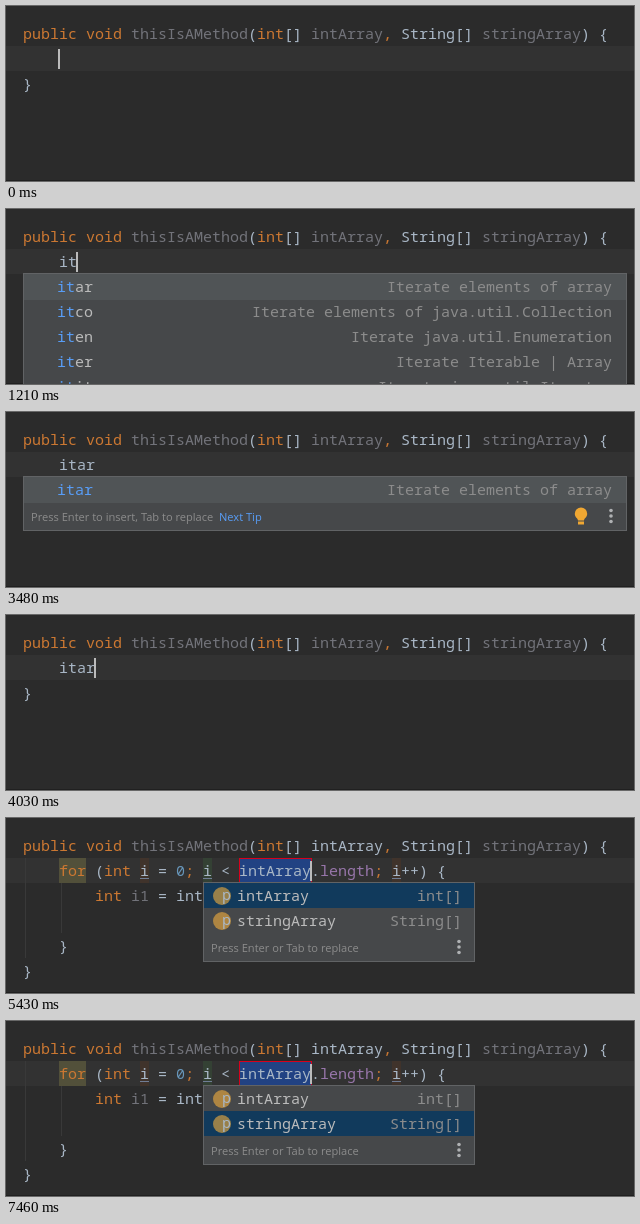
Animation of 628x175 px, one loop 8 s. Source, as an HTML page:

```html
<!DOCTYPE html>
<html lang="en">
<head>
<meta charset="utf-8">
<title>Live template completion</title>
<style>
  html, body { margin: 0; width: 628px; height: 175px; overflow: hidden; background: #2b2b2b; }
  svg { display: block; }
  text { font: 15px "Noto Sans Mono", "DejaVu Sans Mono", monospace; fill: #a9b7c6; white-space: pre; }
  .kw { fill: #cc7832; }
  .unused { fill: #72737a; }
  .num { fill: #6897bb; }
  .field { fill: #9876aa; }
  .item text { fill: #bbbbbb; }
  .item .hit { fill: #589df6; }
  .item .type { fill: #8c8c8c; text-anchor: end; }
  .bold { font-weight: 700; }
  .list { fill: #46484a; stroke: #616365; }
  .soft { fill: #505456; }
  .strong { fill: #113a5c; }
  .hint { font: 11.1px "Open Sans", "Noto Sans", sans-serif; fill: #8c8c8c; }
  .link { fill: #589df6; }
  .select { fill: #214283; }
  .stop { fill: none; stroke: #d8001c; }
  .under { stroke: #707d95; }
  .guide { stroke: #393939; }
  .item .badge { font-size: 13px; fill: #231f20; fill-opacity: .8; text-anchor: middle; }
</style>
</head>
<body>
<svg width="628" height="175" viewBox="0 0 628 175">
  <defs>
    <g id="param">
      <circle r="9" fill="#f4af3d" fill-opacity=".6"/>
      <text class="badge" y="4">p</text>
    </g>
    <g id="method">
      <circle r="9" fill="#f98b9e" fill-opacity=".6"/>
      <text class="badge" y="4">m</text>
    </g>
    <g id="dots" fill="#afb1b3">
      <circle cy="-5.5" r="1.8"/><circle r="1.8"/><circle cy="5.5" r="1.8"/>
    </g>
  </defs>

  <rect width="628" height="175" fill="#2b2b2b"/>
  <rect y="40" width="628" height="25" fill="#323232"/>
  <rect y="174" width="628" height="1" fill="#202020"/>

  <!-- method header -->
  <text x="17" y="33"><tspan class="kw">public void </tspan><tspan class="unused">thisIsAMethod</tspan>(<tspan class="kw">int</tspan>[]</text>
  <text x="305" y="33" class="unused" data-on="0-4420">intArray</text>
  <text x="305" y="33" data-on="4420-8000">intArray</text>
  <text x="377" y="33"><tspan class="kw">, </tspan>String[] <tspan class="unused">stringArray</tspan>) {</text>

  <!-- typed abbreviation -->
  <text x="17" y="83" data-on="0-4180">}</text>
  <text x="53" y="58" data-on="750-4180">i</text>
  <text x="62" y="58" data-on="980-4180">t</text>
  <text x="71" y="58" data-on="1380-4180">a</text>
  <text x="80" y="58" data-on="2630-4180">r</text>

  <!-- expanded loop -->
  <g data-on="4180-8000">
    <path class="guide" d="M19.5 40V140M55.5 65V115"/>
    <g data-on="4500-8000">
      <rect x="53" y="40" width="27" height="25" fill="#52503a"/>
      <rect x="134" y="40" width="9" height="25" fill="#40332b"/>
      <rect x="197" y="40" width="9" height="25" fill="#344134"/>
      <rect x="386" y="40" width="9" height="25" fill="#40332b"/>
    </g>
    <g data-on="4180-5430">
      <rect class="select" x="134" y="40" width="9" height="25"/>
      <rect class="stop" x="134.5" y="40.5" width="9" height="24"/>
    </g>
    <g data-on="5430-8000">
      <rect class="select" x="233" y="40" width="72" height="25"/>
      <rect class="stop" x="233.5" y="40.5" width="72" height="24"/>
    </g>
    <path class="under" d="M134 60.5h9M197 60.5h9M386 60.5h9" data-on="4420-8000"/>
    <text x="53" y="58"><tspan class="kw">for </tspan>(<tspan class="kw">int </tspan>i = <tspan class="num">0</tspan><tspan class="kw">; </tspan>i &lt; intArray.</text>
    <text x="314" y="58" data-on="4180-4420">length</text>
    <text x="314" y="58" class="field" data-on="4420-8000">length</text>
    <text x="368" y="58"><tspan class="kw">; </tspan>i++) {</text>
    <text x="89" y="83" class="kw">int</text>
    <text x="125" y="83" data-on="4180-4420">i1</text>
    <text x="125" y="83" class="unused" data-on="4420-8000">i1</text>
    <text x="152" y="83">= intArray[i]<tspan class="kw">;</tspan></text>
    <text x="53" y="133">}</text>
    <text x="17" y="158">}</text>
  </g>

  <!-- long completion list -->
  <g class="item" data-on="980-1380">
    <rect class="list" x="17.5" y="64.5" width="603" height="120"/>
    <rect class="soft" x="18" y="65" width="602" height="26"/>
    <g data-on="980-1210">
      <use href="#param" x="36" y="78"/>
      <text x="51" y="83"><tspan class="hit">i</tspan>ntArray</text>
      <text x="606" y="83" class="type">int[]</text>
      <text x="51" y="108" class="bold"><tspan class="hit">i</tspan>nt</text>
      <text x="51" y="133" class="bold"><tspan class="hit">i</tspan>f</text>
      <use href="#param" x="36" y="153"/>
      <text x="51" y="158">str<tspan class="hit">i</tspan>ngArray</text>
      <text x="606" y="158" class="type">String[]</text>
      <use href="#method" x="36" y="178"/>
      <text x="51" y="183">toStr<tspan class="hit">i</tspan>ng()</text>
      <text x="606" y="183" class="type">String</text>
    </g>
    <rect x="608" y="66" width="10" height="109" fill="#828486" data-on="980-1060"/>
    <g data-on="1210-1380">
      <text x="51" y="83"><tspan class="hit">it</tspan>ar</text>
      <text x="606" y="83" class="type">Iterate elements of array</text>
      <text x="51" y="108"><tspan class="hit">it</tspan>co</text>
      <text x="606" y="108" class="type">Iterate elements of java.util.Collection</text>
      <text x="51" y="133"><tspan class="hit">it</tspan>en</text>
      <text x="606" y="133" class="type">Iterate java.util.Enumeration</text>
      <text x="51" y="158"><tspan class="hit">it</tspan>er</text>
      <text x="606" y="158" class="type">Iterate Iterable | Array</text>
      <text x="51" y="183"><tspan class="hit">it</tspan>it</text>
      <text x="606" y="183" class="type">Iterate java.util.Iterator</text>
    </g>
  </g>

  <!-- single match -->
  <g data-on="1380-4030">
    <rect class="list" x="17.5" y="64.5" width="603" height="54"/>
    <rect class="soft" x="18" y="65" width="602" height="26"/>
    <g class="item">
      <text x="51" y="83" data-on="1380-2630"><tspan class="hit">ita</tspan>r</text>
      <text x="51" y="83" data-on="2630-4030"><tspan class="hit">itar</tspan></text>
      <text x="606" y="83" class="type">Iterate elements of array</text>
    </g>
    <text class="hint" x="25" y="109" data-on="1530-4030">Press Enter to insert, Tab to replace</text>
    <text class="hint link" x="213" y="109" data-on="1620-4030">Next Tip</text>
    <g fill="#f0a732" data-on="2000-2700 3160-4030">
      <path d="M572 108.5C572 106 568.8 105.5 568.8 101.7A6.2 6.2 0 0 1 581.2 101.7C581.2 105.5 578 106 578 108.5Z"/>
      <rect x="572" y="109.5" width="6" height="3"/>
    </g>
    <use href="#dots" x="605" y="104"/>
  </g>

  <!-- array choice -->
  <g data-on="5430-8000">
    <rect class="list" x="197.5" y="64.5" width="271" height="79"/>
    <rect class="strong" x="198" y="65" width="270" height="25" data-on="5430-7310"/>
    <rect class="strong" x="198" y="90" width="270" height="25" data-on="7310-8000"/>
    <g class="item">
      <use href="#param" x="216" y="78"/>
      <text x="231" y="83">intArray</text>
      <text x="456" y="83" class="type">int[]</text>
      <use href="#param" x="216" y="103"/>
      <text x="231" y="108">stringArray</text>
      <text x="456" y="108" class="type">String[]</text>
    </g>
    <text class="hint" x="205" y="134">Press Enter or Tab to replace</text>
    <use href="#dots" x="453" y="129"/>
  </g>

  <!-- caret positions -->
  <g fill="#bbbbbb">
    <rect x="52" y="43" width="2" height="20" data-on="0-450"/>
    <rect x="61" y="43" width="2" height="20" data-on="750-980"/>
    <rect x="70" y="43" width="2" height="20" data-on="980-1380"/>
    <rect x="79" y="43" width="2" height="20" data-on="1380-2000 2460-2630"/>
    <rect x="88" y="43" width="2" height="20" data-on="2630-3480 4030-4180"/>
    <rect x="142" y="43" width="2" height="20" data-on="4180-4970"/>
    <rect x="304" y="43" width="2" height="20" data-on="5430-5980 6530-7000 7460-8000"/>
  </g>
</svg>
<script>
  const LOOP = 8000;
  const parts = [...document.querySelectorAll("[data-on]")].map(el => ({
    el,
    spans: el.dataset.on.split(" ").map(span => span.split("-").map(Number))
  }));
  const start = performance.now();

  function draw(now) {
    const t = Math.max(0, now - start) % LOOP;
    for (const { el, spans } of parts) {
      const on = spans.some(([from, to]) => t >= from && t < to);
      el.style.display = on ? "" : "none";
    }
    requestAnimationFrame(draw);
  }
  draw(start);
</script>
</body>
</html>
```
